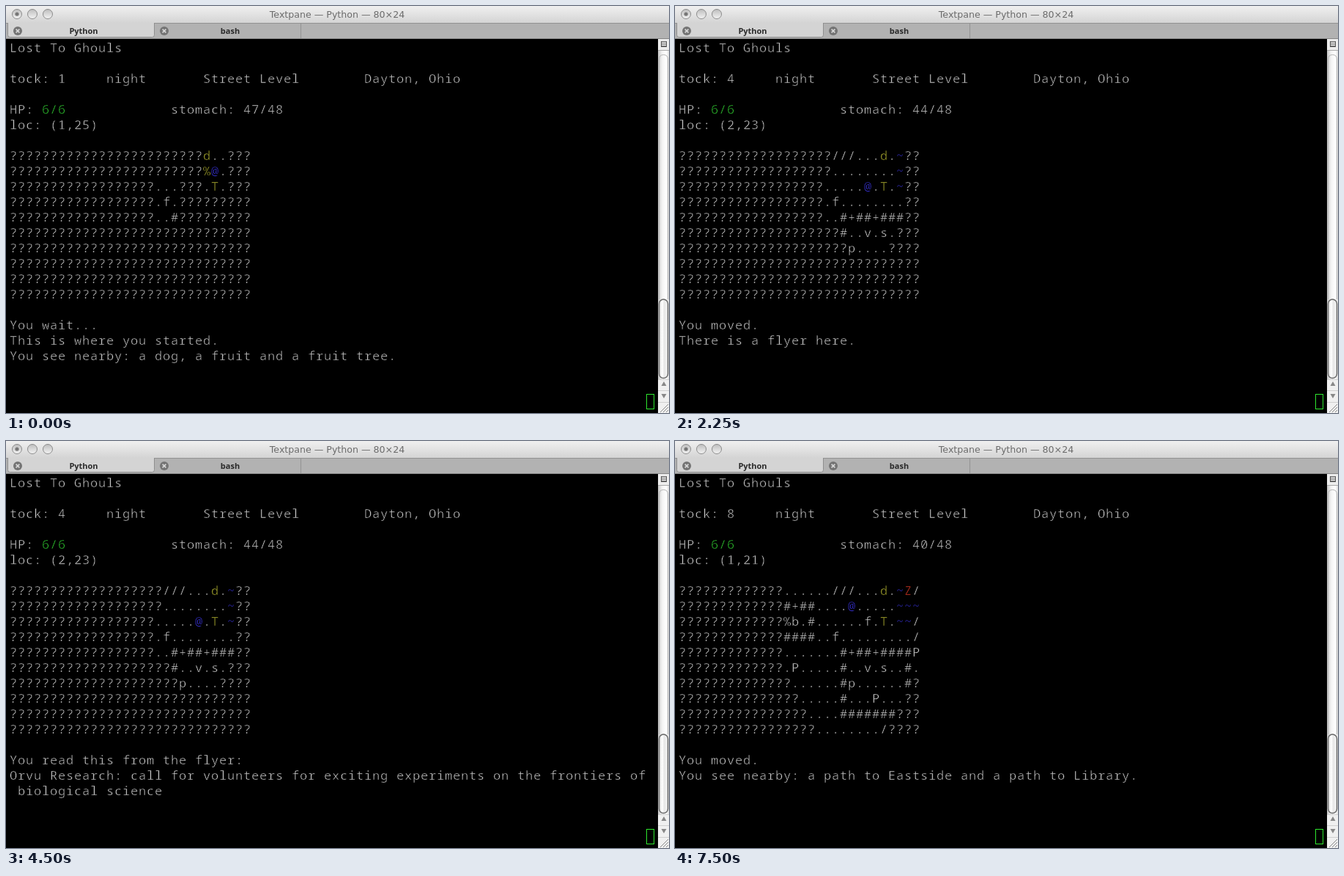
An HTML page for the animation above (8 s loop, 905 by 555 pixels).

```html
<!DOCTYPE html>
<html lang="en">
<head>
<meta charset="utf-8">
<title>Roguelike in a console</title>
<style>
html, body { margin: 0; width: 100%; height: 100%; overflow: hidden; background: #000; }
svg, pre { position: absolute; left: 0; top: 0; }
/* The background-coloured stroke thins the letters. */
pre {
  left: 5px; top: 46px; margin: 0; color: #c8c8c8;
  font: 300 17px/21px "Noto Sans Mono", monospace; letter-spacing: .8px;
  font-variant-ligatures: none; -webkit-text-stroke: .45px #000;
}
.g { color: #2fc42f; }
.y { color: #b0b030; }
.b { color: #3f38f0; }
.r { color: #cc3624; }
.sel { display: inline-block; height: 21px; background: #bfbfbf; color: #000; -webkit-text-stroke-color: #bfbfbf; }
.title { font: 12.6px "DejaVu Sans", sans-serif; fill: #6c6c6c; }
.tab { font: bold 11px "Open Sans", sans-serif; fill: #2a2a2a; }
</style>
</head>
<body>
<svg width="905" height="555" viewBox="0 0 905 555">
  <defs>
    <linearGradient id="bar" x2="0" y2="1">
      <stop stop-color="#f0f0f0"/><stop offset="1" stop-color="#d4d4d4"/>
    </linearGradient>
    <linearGradient id="knob" x2="0" y2="1">
      <stop stop-color="#bdbdbd"/><stop offset="1" stop-color="#f4f4f4"/>
    </linearGradient>
    <linearGradient id="track">
      <stop stop-color="#c4c4c4"/><stop offset=".35" stop-color="#f2f2f2"/>
      <stop offset=".75" stop-color="#fff"/><stop offset="1" stop-color="#dedede"/>
    </linearGradient>
    <linearGradient id="thumb">
      <stop stop-color="#d8d8d8"/><stop offset=".35" stop-color="#fff"/>
      <stop offset=".6" stop-color="#e6e6e6"/><stop offset="1" stop-color="#fafafa"/>
    </linearGradient>
    <g id="close">
      <circle r="6" fill="#747474"/>
      <path d="M-2.4-2.4 2.4 2.4M2.4-2.4-2.4 2.4" stroke="#d8d8d8" stroke-width="1.6"/>
    </g>
    <circle id="light" r="6.5" fill="url(#knob)" stroke="#8c8c8c"/>
  </defs>

  <rect width="905" height="23" fill="url(#bar)"/>
  <use href="#light" x="15" y="11"/>
  <use href="#light" x="36" y="11"/>
  <use href="#light" x="57" y="11"/>
  <circle cx="15" cy="11" r="2.6" fill="#777"/>
  <text class="title" x="452" y="16" text-anchor="middle">Textpane — Python — 80×24</text>

  <rect y="23" width="905" height="22" fill="#b2b2b2"/>
  <path d="M0 23.5H905M402.5 24V44" stroke="#929292"/>
  <path d="M2.5 23V39.5Q2.5 42.5 5.5 42.5H199.5Q202.5 42.5 202.5 39.5V23" fill="#d4d4d4" stroke="#8e8e8e"/>
  <path d="M3 23.5H202" stroke="#d4d4d4"/>
  <path d="M0 44.5H905" stroke="#858585"/>
  <use href="#close" x="16" y="34"/>
  <use href="#close" x="216" y="34"/>
  <text class="tab" x="106" y="38" text-anchor="middle">Python</text>
  <text class="tab" x="306" y="38" text-anchor="middle">bash</text>

  <rect x="890" y="45" width="15" height="510" fill="url(#track)"/>
  <rect x="890" y="45" width="15" height="15" fill="#ededed"/>
  <path d="M890 60.5H905" stroke="#aaa"/>
  <rect x="894.5" y="48.5" width="7" height="7" fill="#fff" stroke="#555"/>
  <path d="M895 50.5H901M895 52.5H901M895 54.5H901" stroke="#777"/>
  <path d="M891.5 400V73Q891.5 66.5 897.5 66.5T903.5 73V400" fill="none" stroke="#b4b4b4"/>
  <rect x="891.5" y="400" width="12" height="107.5" rx="6" fill="url(#thumb)" stroke="#686868" stroke-width="1.5"/>
  <rect x="890" y="509" width="15" height="46" fill="#f0f0f0"/>
  <path d="M890 509.5H905M890 524.5H905M890 540.5H905" stroke="#d0d0d0"/>
  <path d="M894.5 518H901.5L898 512ZM894.5 529H901.5L898 535Z" fill="#888"/>
  <path d="M893 554 904 543M897 554 904 547M901 554 904 551" stroke="#888"/>

  <rect x="874.5" y="529.5" width="10" height="20" fill="none" stroke="#2ee62e"/>
</svg>
<pre id="screen"></pre>

<script>
const WORLD = [
  "?????????????......///.....~Z/",
  "?????????????#+##..........~~~",
  "?????????????%b.#......f.T.~~/",
  "?????????????####..f........./",
  "?????????????.......#+##+####P",
  "?????????????.P.....#..v.s..#.",
  "??????????????......#p......#?",
  "???????????????.....#...P...??",
  "????????????????....#######???",
  "?????????????????......../????"
];
// Player position [row, column] at each tock, from tock 1.
const WALK = [[1, 25], [1, 24], [1, 24], [2, 23], [3, 22], [3, 22], [2, 22], [1, 21]];

const INK = { d: "y", T: "y", "@": "b", "~": "b", Z: "r" };
const paint = (cls, text) => `<span class="${cls}">${text}</span>`;

// Sight is an octagon that widens by one cell each tock.
function inSight(row, col, [r, c], reach) {
  const dr = Math.abs(row - r), dc = Math.abs(col - c);
  return Math.max(dr, dc) <= reach && dr + dc <= Math.ceil(reach * 1.5);
}

function cell(row, col, tock) {
  const [r, c] = WALK[tock - 1];
  if (row === r && col === c) return "@";
  const seen = inSight(row, col, [3, 19], 1) ||
    WALK.slice(0, tock).some((spot, i) => inSight(row, col, spot, i + 1));
  if (!seen) return "?";
  if (row === 0 && col === (tock < 2 ? 24 : 25)) return "d";
  if (row === 1 && col === 24 && tock < 3) return "%";
  return WORLD[row][col];
}

function mapRow(row, tock) {
  return [...WORLD[row]].map((_, col) => cell(row, col, tock)).join("")
    .replace(/[dT@~Z]|%(?=@)/g, ch => paint(INK[ch] || "y", ch));
}

function game(tock, ...messages) {
  const status = `tock: ${tock}`.padEnd(12) + "night".padEnd(12) +
    "Street Level".padEnd(20) + "Dayton, Ohio";
  return [
    "Lost To Ghouls", "", status, "",
    `HP: ${paint("g", "6/6")}${" ".repeat(13)}stomach: ${48 - tock}/48`,
    `loc: (${WALK[tock - 1]})`, "",
    ...WORLD.map((_, row) => mapRow(row, tock)), "",
    ...messages
  ].join("\n");
}

function menu(chosen) {
  const items = ["note", "flyer", "letter", "book"].map((name, i) =>
    i === chosen ? paint("sel", `-&gt; a ${name}`) : `   a ${name}`);
  return ["Choose Item To Read", "", "", "",
    "Readable Items:".padEnd(67) + "Page 1 of 1", "", ...items].join("\n");
}

const near = things => `You see nearby: ${things}.`;

const SCENES = [
  game(1, "You wait...", "This is where you started.", near("a dog, a fruit and a fruit tree")),
  game(2, "You moved.", "There is a fruit here.", "You can pick it up.",
    near("a dog, a flyer and a fruit tree")),
  game(3, "You picked up a fruit.",
    "tree grew a fruit ((2,25) on level Street Level in region Dayton, Ohio)",
    near("a dog, a flyer and a fruit tree and a fruit")),
  game(4, "You moved.", "There is a flyer here."),
  menu(0),
  menu(1),
  game(4, "You read this from the flyer:",
    "Orvu Research: call for volunteers for exciting experiments on the frontiers of",
    " biological science"),
  game(5, "You moved.", near("a flyer and a door")),
  game(6, "You moved.", near("a flyer and a door")),
  game(7, "You moved.", near("a flyer")),
  game(8, "You moved.", near("a path to Eastside and a path to Library"))
];

const LOOP = 8000, STEP = 750;
const screenEl = document.getElementById("screen");
const start = performance.now();
let shown = -1;

function tick() {
  const time = (performance.now() - start) % LOOP;
  const scene = Math.floor(time / STEP);
  if (scene !== shown) screenEl.innerHTML = SCENES[shown = scene];
  requestAnimationFrame(tick);
}
tick();
</script>
</body>
</html>
```
